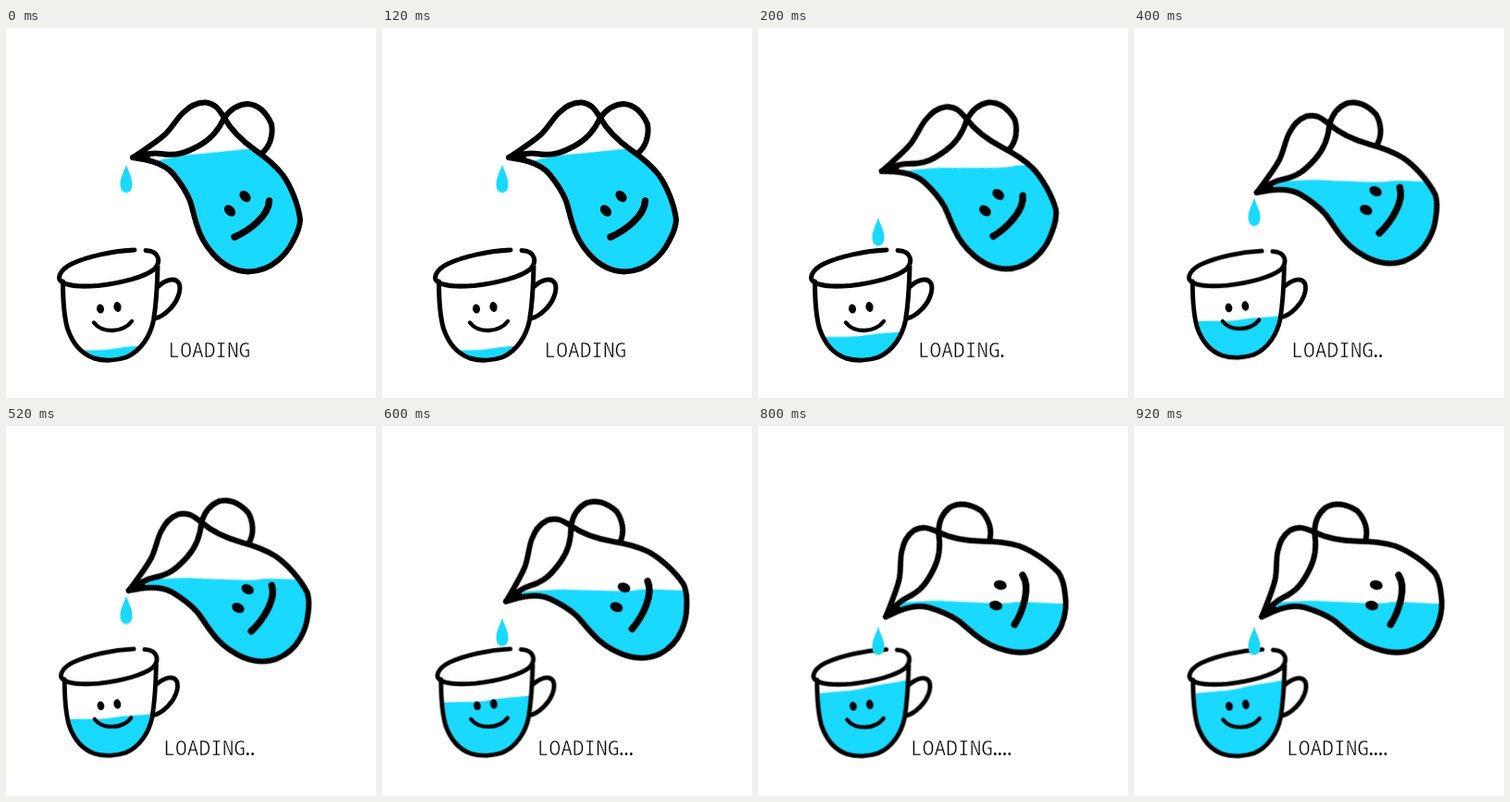
An HTML page without scripts for the animation above (1000 ms loop, 400 by 400 pixels).

```html
<!DOCTYPE html>
<html lang="en">
<head>
<meta charset="utf-8">
<title>Loading</title>
<style>
  html, body { margin: 0; height: 100%; overflow: hidden; background: #fff; }
  svg { display: block; width: 100vw; height: 100vh; }

  .ink { fill: none; stroke: #000; stroke-width: 6; stroke-linecap: round; stroke-linejoin: round; }
  .thin { stroke-width: 5; }
  .water { fill: #19d9ff; }
  text { font: 21.2px "Noto Sans Mono", "DejaVu Sans Mono", monospace; white-space: pre; }
  .word { stroke: #fff; stroke-width: .5; }
  .dots { letter-spacing: -7.5px; }

  .jug, .level, .cup, .fill, .drop, .label, .dots tspan { animation: 1s step-end infinite; }
  .jug, .level { transform-origin: 244px 171.5px; }
  .cup { transform-origin: 115px 272px; }
  .jug { animation-name: tip; }
  .level { animation-name: level; }
  .cup { animation-name: cup; }
  .fill { animation-name: fill; }
  .drop { animation-name: drop; }
  .label { animation-name: label; }
  .dots .a { animation-name: a; }
  .dots .b { animation-name: b; }
  .dots .c { animation-name: c; }
  .dots .d { animation-name: d; }

  @keyframes tip {
    0% { transform: rotate(0deg); }
    20% { transform: rotate(-7.8deg); }
    40% { transform: rotate(-19.7deg); }
    60% { transform: rotate(-25.8deg); }
    80%, 100% { transform: rotate(-34.6deg); }
  }
  /* undo the jug's tilt so the surface stays nearly flat */
  @keyframes level {
    0% { transform: translateY(-39.5px) rotate(-7.5deg); }
    20% { transform: rotate(7.8deg) translateY(-21px) rotate(-2deg); }
    40% { transform: rotate(19.7deg) translateY(-6px) rotate(.3deg); }
    60% { transform: rotate(25.8deg) translateY(6px) rotate(-.3deg); }
    80%, 100% { transform: rotate(34.6deg) translateY(19px) rotate(.6deg); }
  }
  @keyframes cup {
    0%, 20% { transform: none; }
    40% { transform: scale(.967); }
    60% { transform: translate(.5px, 0) scale(.967); }
    80%, 100% { transform: translate(.5px, .5px) scale(.967); }
  }
  @keyframes fill {
    0% { transform: translate(111px, 346.5px) rotate(-1deg); }
    20% { transform: translate(111px, 332px) rotate(-1deg); }
    40% { transform: translate(111px, 316.5px) rotate(-1deg); }
    60% { transform: translate(111px, 297px) rotate(-2deg); }
    80%, 100% { transform: translate(111px, 283px) rotate(-6deg); }
  }
  @keyframes drop {
    0% { transform: translate(130px, 147.5px); }
    20% { transform: translate(130px, 205px); }
    40% { transform: translate(130px, 183.5px); }
    60% { transform: translate(130px, 207.5px); }
    80%, 100% { transform: translate(130px, 217px); }
  }
  @keyframes label {
    0% { transform: none; }
    20% { transform: translateX(-2.6px); }
    40% { transform: translateX(-5.2px); }
    60% { transform: translateX(-7.8px); }
    80%, 100% { transform: translateX(-10.4px); }
  }
  @keyframes a { 0% { fill: transparent; } 20%, 100% { fill: #000; } }
  @keyframes b { 0% { fill: transparent; } 40%, 100% { fill: #000; } }
  @keyframes c { 0% { fill: transparent; } 60%, 100% { fill: #000; } }
  @keyframes d { 0% { fill: transparent; } 80%, 100% { fill: #000; } }
</style>
</head>
<body>
<svg viewBox="0 0 400 400">
  <defs>
    <path id="jug" d="M137 140C150 142 170 145 181 158C190 169 195 177 199 187C202 196 203 203 206 212C211 230 230 263 262 263.500C290 263 305 241 310 231C315 222 318 214 318 207C316 191 308 171 299 158.500C289 146 278 138 270 132.500C254 121 243 110 236 97C230 110 222 120 209 127C196 134 185 139 168 136C155 134 146 138 137 140Z"/>
    <path id="cup" d="M61.500 274C61.500 294 62 309 66.500 325C72 341 81 352 95 357C106 360.500 120 359.500 130 356C146 349 156 333 159.500 316C162.500 298 163.500 280 164 258"/>
    <clipPath id="in-jug"><use href="#jug"/></clipPath>
    <clipPath id="in-cup"><use href="#cup"/></clipPath>
  </defs>

  <g class="jug">
    <g clip-path="url(#in-jug)">
      <path class="water level" d="M100 176Q150 173 170 171.500T200 170.500T240 172T275 171.500T310 171.500T400 171V400H100Z"/>
    </g>
    <g class="ink">
      <use href="#jug"/>
      <path d="M137 140C152 130 162 124 172 115C180 107 184 99 191 92C197 86 206 80 216 80.500C227 82 230 88 236 97C244 86 252 82.500 261 82C273 83 281 90 287 104C289 115 286 128 276 136"/>
      <path d="M247 226C263 219 284 203 284.500 187" stroke-width="7.500"/>
    </g>
    <path d="M134 140L156 135V143Z"/>
    <ellipse rx="7" ry="5.200" transform="translate(242 197.500) rotate(46)"/>
    <ellipse rx="7" ry="5.200" transform="translate(258.500 182) rotate(46)"/>
  </g>

  <g class="cup">
    <g clip-path="url(#in-cup)">
      <path class="water fill" d="M-70 1Q-35 1 -20 1.500T8 0T30 -2T70 -5V120H-70Z"/>
    </g>
    <g class="ink thin">
      <use href="#cup"/>
      <path d="M139 240C115 241 88 247 71 255C61 260 56 267 58 272C62 279 82 280 100 278.500C126 275.500 150 269 160 261C168 253 166 241 151 240.500"/>
      <path d="M165 279C173 272 183 269 187 276C190 284 185 296 177 304C172 309 167 313 161 314"/>
      <path d="M95 318.500C104 330 126 330 136 317" stroke-width="4.400"/>
    </g>
    <ellipse cx="102" cy="303.500" rx="4" ry="5" transform="rotate(-10 102 303.500)"/>
    <ellipse cx="120.500" cy="301.500" rx="4" ry="5.500" transform="rotate(-10 120.500 301.500)"/>
  </g>

  <path class="water drop" d="M0 0C2 7 6.500 14 6.500 21C6.500 27 4 30.500 0 30.500S-6.500 27 -6.500 21C-6.500 14 -2 7 0 0Z"/>

  <g class="label">
    <text class="word" x="175.500" y="356">LOADING</text>
    <text class="dots" x="260.300" y="356"><tspan class="a">.</tspan><tspan class="b">.</tspan><tspan class="c">.</tspan><tspan class="d">.</tspan></text>
  </g>
</svg>
</body>
</html>
```
